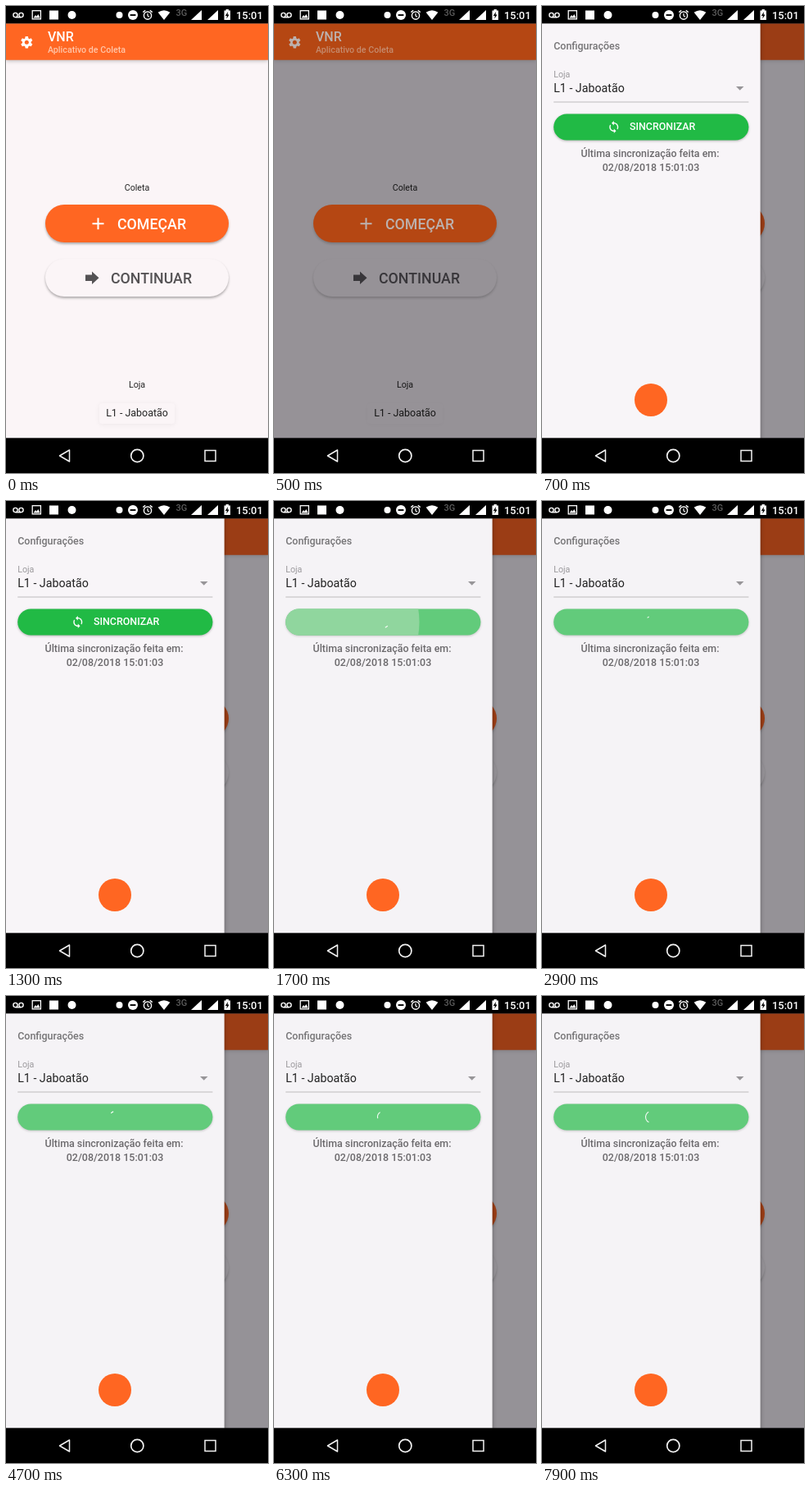
An HTML page with a canvas that plays this animation: 320 px wide and 569 px high, repeating every 8 s.

```html
<!DOCTYPE html>
<html lang="pt-BR">
<head>
<meta charset="utf-8">
<title>Aplicativo de Coleta</title>
<style>
  html, body { margin: 0; width: 100%; height: 100%; overflow: hidden; background: #000; }
  canvas { display: block; width: 320px; height: 569px; }
</style>
</head>
<body>
<canvas id="stage"></canvas>
<script>
const W = 320, H = 569, LOOP = 8000, TAU = Math.PI * 2;
const TOP = 21.33, BOTTOM = 526.33, DRAWER = 266.67;
const canvas = document.getElementById('stage');
const ctx = canvas.getContext('2d');
const dpr = window.devicePixelRatio || 1;
canvas.width = W * dpr;
canvas.height = H * dpr;

const LIVE = { bg: '#fbf5f7', orange: '#ff6622', light: '#ffffff', sub: '#ffc5a8',
  ink: '#242424', soft: '#545254', shadow: 'rgba(0,0,0,.3)', faint: 'rgba(0,0,0,.06)' };
const FADING = { bg: '#969297', orange: '#b54713', light: '#bcb1ae', sub: '#c58b6e',
  ink: '#161616', soft: '#38363a', shadow: 'rgba(0,0,0,.18)', faint: 'rgba(0,0,0,.02)' };
const DIMMED = { ...FADING, bg: '#959297', orange: '#9b3d15' };

const SYNC = new Path2D('M12 4V1L8 5l4 4V6c3.31 0 6 2.69 6 6 0 1.01-.25 1.97-.7 2.8l1.46 1.46' +
  'C19.54 15.03 20 13.57 20 12c0-4.42-3.58-8-8-8zm0 14c-3.31 0-6-2.69-6-6 0-1.01.25-1.97.7-2.8' +
  'L5.24 7.74C4.46 8.97 4 10.43 4 12c0 4.42 3.58 8 8 8v3l4-4-4-4v3z');

function rect(x, y, w, h, color) {
  ctx.fillStyle = color;
  ctx.fillRect(x, y, w, h);
}

function disc(x, y, r, color) {
  ctx.fillStyle = color;
  ctx.beginPath();
  ctx.arc(x, y, r, 0, TAU);
  ctx.fill();
}

function ring(x, y, r, width, color) {
  ctx.strokeStyle = color;
  ctx.lineWidth = width;
  ctx.beginPath();
  ctx.arc(x, y, r, 0, TAU);
  ctx.stroke();
}

function poly(color, ...p) {
  ctx.fillStyle = color;
  ctx.beginPath();
  for (let i = 0; i < p.length; i += 2) ctx.lineTo(p[i], p[i + 1]);
  ctx.closePath();
  ctx.fill();
}

function line(color, width, ...p) {
  ctx.strokeStyle = color;
  ctx.lineWidth = width;
  ctx.beginPath();
  for (let i = 0; i < p.length; i += 2) ctx.lineTo(p[i], p[i + 1]);
  ctx.stroke();
}

function text(str, x, y, size, color, weight = 400, align = 'left') {
  ctx.font = `${weight} ${size}px Roboto, sans-serif`;
  ctx.textAlign = align;
  ctx.fillStyle = color;
  ctx.fillText(str, x, y);
}

function pill(x, y, w, h, r, color, shadow, blur = 3, drop = 2) {
  ctx.save();
  ctx.shadowColor = shadow;
  ctx.shadowBlur = blur * dpr;
  ctx.shadowOffsetY = drop * dpr;
  ctx.fillStyle = color;
  ctx.beginPath();
  ctx.roundRect(x, y, w, h, r);
  ctx.fill();
  ctx.restore();
}

function gear(x, y, color, hole) {
  ctx.save();
  ctx.translate(x, y);
  for (let i = 0; i < 6; i++) {
    poly(color, -2.2, -4, -1.6, -7.2, 1.6, -7.2, 2.2, -4);
    ctx.rotate(TAU / 6);
  }
  disc(0, 0, 5.3, color);
  disc(0, 0, 2.5, hole);
  ctx.restore();
}

function statusBar() {
  const c = '#fff';
  rect(0, 0, W, TOP, '#000');
  ring(11.5, 11, 2.6, 1.4, c);
  ring(18.5, 11, 2.6, 1.4, c);
  line(c, 1.4, 11.5, 13.8, 18.5, 13.8);
  ctx.strokeStyle = c;
  ctx.lineWidth = 1.3;
  ctx.strokeRect(32.2, 5.7, 10.2, 10.2);
  poly(c, 33.5, 14.5, 36, 11, 37.5, 12.8, 39.3, 10, 41.5, 14.5);
  rect(53, 5.5, 11, 11, c);
  disc(80.5, 11, 5, c);
  disc(138.5, 11, 4, c);
  disc(155, 11, 6, c);
  rect(151.6, 10.1, 6.8, 1.9, '#000');
  ring(173, 11.6, 4.6, 1.4, c);
  line(c, 1.2, 173, 9, 173, 12, 175, 13.2);
  line(c, 1.4, 167.3, 7.6, 170.2, 5.2);
  line(c, 1.4, 175.8, 5.2, 178.7, 7.6);
  ctx.fillStyle = c;
  ctx.beginPath();
  ctx.moveTo(193, 17);
  ctx.lineTo(185.6, 7.8);
  ctx.quadraticCurveTo(193, 2.6, 200.4, 7.8);
  ctx.fill();
  text('3G', 207.5, 12, 11, '#5c5c5c', 500);
  poly(c, 226, 17, 239, 17, 239, 5);
  poly(c, 246, 17, 259, 17, 259, 5);
  rect(266.5, 5.5, 7.5, 11.5, c);
  rect(268.6, 4, 3.3, 2, c);
  poly('#000', 271, 7, 267.8, 12, 269.8, 12, 269.4, 15.5, 272.6, 10.4, 270.6, 10.4);
  text('15:01', 281, 15.8, 12.9, c, 500);
}

function navBar() {
  const c = '#f2f2f2';
  rect(0, BOTTOM, W, H - BOTTOM, '#000');
  ctx.lineJoin = 'round';
  line(c, 1.5, 77.5, 541, 65.5, 548, 77.5, 555, 77.5, 541, 65.5, 548);
  ctx.lineJoin = 'miter';
  ring(160.3, 548, 7.6, 1.7, c);
  ctx.lineWidth = 1.5;
  ctx.strokeRect(243, 541.5, 13, 13);
}

function home(c) {
  rect(0, 0, W, H, c.bg);
  pill(0, TOP, W, 44.44, 0, c.orange, c.shadow, 5, 1.5);
  gear(25.3, 44.3, c.light, c.orange);
  text('VNR', 51, 42.7, 16, c.light, 500);
  text('Aplicativo de Coleta', 51, 57, 10.67, c.sub, 500);

  text('Coleta', 160, 225, 10.67, c.ink, 400, 'center');
  pill(48, 242, 224, 46, 23, c.orange, c.shadow);
  rect(105.5, 264.2, 14, 2, c.light);
  rect(111.5, 258.2, 2, 14, c.light);
  text('COMEÇAR', 136, 271.5, 17.78, c.light, 500);

  pill(48, 308, 224, 46, 23, c.bg, c.shadow);
  poly(c.soft, 97, 327.5, 105, 327.5, 105, 323.5, 113.5, 331.2, 105, 339, 105, 335, 97, 335);
  text('CONTINUAR', 128, 337.5, 17.78, c.soft, 500);

  text('Loja', 160, 465, 10.67, c.ink, 400, 'center');
  pill(114, 484, 92, 25, 3, c.bg, c.faint, 6, 1);
  text('L1 - Jaboatão', 160, 499.5, 12.44, c.ink, 400, 'center');
}

// CSS ease-in-out, cubic-bezier(.42, 0, .58, 1)
function easeInOut(x) {
  let lo = 0, hi = 1;
  for (let i = 0; i < 24; i++) {
    const s = (lo + hi) / 2, r = 1 - s;
    if (3 * r * r * s * .42 + 3 * r * s * s * .58 + s * s * s < x) lo = s; else hi = s;
  }
  return lo * lo * (3 - 2 * lo);
}

// Dash runs over a 1.5 s cycle on a ring turning once per 2 s
function spinner(x, y, age) {
  const full = 40 * Math.PI;
  const phase = age % 1.5 / .75;
  let from, len;
  if (phase < 1) {
    const e = easeInOut(phase);
    from = 35 * e;
    len = 1 + 88 * e;
  } else {
    from = 35 + 89 * easeInOut(phase - 1);
    len = 89;
  }
  const to = Math.min(from + len, full);
  const turn = age / 2 * TAU;
  ctx.strokeStyle = '#f4fbf5';
  ctx.lineWidth = 1.1;
  ctx.beginPath();
  ctx.arc(x, y, 7, turn + from / 20, turn + to / 20);
  ctx.stroke();
}

function ripple(t) {
  const age = t - 1700;
  if (age > 300) return;
  ctx.save();
  ctx.beginPath();
  ctx.roundRect(14.22, 131.5, 238.2, 32, 16);
  ctx.clip();
  ctx.globalAlpha = 1 - age / 300;
  disc(80, 147.5, 97.5 + age * .5, '#90d69e');
  ctx.restore();
}

function drawer(t) {
  const busy = t >= 1700;
  pill(-10, 10, DRAWER + 10, 530, 0, busy ? '#f5f3f6' : '#f8f5f8', 'rgba(0,0,0,.3)', 5, 0);
  text('Configurações', 14.2, 53.3, 12.44, '#757476', 500);
  text('Loja', 14.2, 87, 10.67, '#9b999c');
  text('L1 - Jaboatão', 14.2, 105, 14.22, '#222');
  poly('#979598', 237, 98, 246.5, 98, 241.75, 102.8);
  rect(14.2, 116.5, 238.2, 1, '#bdbbbe');

  pill(14.22, 131.5, 238.2, 32, 16, busy ? '#62cb7b' : '#21ba45',
    busy ? 'rgba(0,0,0,.2)' : 'rgba(0,0,0,.28)', 3, 1);
  if (busy) {
    ripple(t);
    spinner(133.5, 147.5, (t - 1530) / 1000);
  } else {
    ctx.save();
    ctx.translate(79.5, 139.2);
    ctx.scale(.69, .69);
    ctx.fillStyle = '#fff';
    ctx.fill(SYNC);
    ctx.restore();
    text('SINCRONIZAR', 107, 151.3, 12.44, '#fff', 500);
  }

  text('Última sincronização feita em:', 132, 184.3, 12.44, '#6b696c', 500, 'center');
  text('02/08/2018 15:01:03', 133, 201, 12.44, '#6b696c', 500, 'center');
  disc(133, 480, 20, '#ff6622');
}

function draw(t) {
  ctx.setTransform(dpr, 0, 0, dpr, 0, 0);
  home(t < 500 ? LIVE : t < 700 ? FADING : DIMMED);
  if (t >= 700) drawer(t);
  statusBar();
  navBar();
}

// The picture holds for 500 ms, then advances every 200 ms
function held(t) {
  return t < 500 ? 0 : 500 + Math.floor((t - 500) / 200) * 200;
}

const start = performance.now();
function tick() {
  draw(held((performance.now() - start) % LOOP));
  requestAnimationFrame(tick);
}
tick();
</script>
</body>
</html>
```
